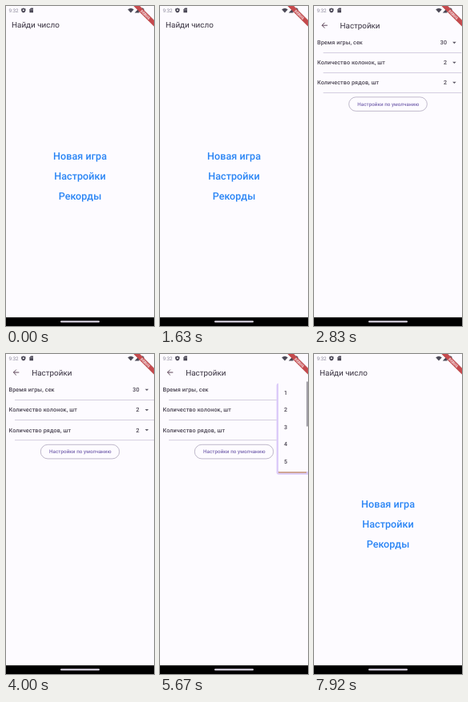
Recreate the animation shown at these times as an HTML page. Size 185x400 px, loop 8000 ms.

```html
<!DOCTYPE html>
<html lang="ru">
<head>
<meta charset="utf-8">
<title>Найди число</title>
<style>
  html, body { margin: 0; width: 100%; height: 100%; overflow: hidden; background: #fdfbff; }
  svg { display: block; width: 100vw; height: 100vh; }
  text { font-family: Roboto, sans-serif; fill: #37313f; text-rendering: geometricPrecision; }
  .title { font-size: 9.9px; }
  .label { font-size: 7.2px; font-weight: 500; letter-spacing: .11px; fill: #4a4452; }
  .link { font-size: 12.6px; font-weight: 500; fill: #2a85f5; letter-spacing: .04px; }
  .mid { text-anchor: middle; }
  .end { text-anchor: end; }
  .reset { font-size: 6.3px; font-weight: 500; fill: #7c6ab2; letter-spacing: .04px; }
  .clock { font-size: 6.3px; fill: #8a8799; }
  .debug { font-size: 4.6px; font-weight: 900; fill: #f6e3e6; }
</style>
</head>
<body>
<svg viewBox="0 0 185 400">
  <defs>
    <clipPath id="screen"><rect width="185" height="389.2"/></clipPath>
    <clipPath id="menuClip"><rect id="menuWindow" x="140" width="45"/></clipPath>
    <filter id="blur"><feGaussianBlur stdDeviation=".5"/></filter>
  </defs>
  <rect width="185" height="400" fill="#fdfbff"/>
  <g clip-path="url(#screen)">
    <g id="home">
      <rect width="185" height="390" fill="#fdfbff"/>
      <text class="title" x="7" y="26.5">Найди число</text>
    </g>
    <g id="settings">
      <rect width="185" height="390" fill="#fdfbff"/>
      <path d="M16.3 23H9.4M12.8 19.6L9.4 23L12.8 26.4" fill="none" stroke="#4a2f45" stroke-width=".9"/>
      <text class="title" x="32.2" y="26.5">Настройки</text>
      <g id="rows"></g>
      <rect x="43.3" y="113.3" width="98.4" height="17.6" rx="8.8" fill="none" stroke="#a49bb4" stroke-width=".7"/>
      <text class="reset mid" x="92.8" y="124.4">Настройки по умолчанию</text>
    </g>
    <g id="menu">
      <rect id="shadow" x="145.6" width="45" rx="3" fill="#dccbf9" filter="url(#blur)"/>
      <rect id="edge" x="148" width="35" height="2.2" fill="#cfa795"/>
      <rect id="panel" x="148" width="40" rx="1.5" fill="#fdfbff"/>
      <g id="items" clip-path="url(#menuClip)">
        <rect x="183" y="34.5" width="2" height="56" fill="#a4a1a9"/>
      </g>
    </g>
  </g>
  <g fill="#4b4856">
    <text class="clock" x="3.5" y="7.8">9:32</text>
    <path d="M21.8 2.4L24.5 3.5V5.4Q24.3 7.6 21.8 8.6Q19.3 7.6 19.1 5.4V3.5Z"/>
    <circle cx="21.8" cy="5.3" r="1" fill="#fdfbff"/>
    <path d="M31 2.6H34V8.3H29.4V4.2Z"/>
    <path d="M30.9 4.2V5.2M32.1 4.2V5.2M33.2 4.2V5.2" stroke="#fdfbff" stroke-width=".5"/>
    <path d="M152.2 4.2Q156 1.2 159.8 4.2L156 8.5Z"/>
    <path d="M160.8 8.4L166.5 2.6V8.4Z"/>
    <path d="M168.8 3.2H169.8V2.4H171.4V3.2H172.4V8.5H168.8Z"/>
  </g>
  <g transform="translate(185 0) rotate(45)">
    <rect x="-20" y="12.6" width="40" height="5.4" fill="#000" opacity=".3" filter="url(#blur)"/>
    <rect x="-20" y="12.6" width="40" height="5.4" fill="#c54a4d"/>
    <text class="debug mid" y="17">DEBUG</text>
  </g>
  <rect y="389.2" width="185" height="10.8"/>
  <rect x="68" y="393.4" width="49" height="2" rx="1" fill="#eee8f8"/>
</svg>
<script>
const LOOP = 8000;
const PUSH = 2670, OPEN = 4950, CLOSE = 6790, POP = 7500, SPAN = 300;
const MENU = { top: 33.5, bottom: 147, rowTop: 59, rowBottom: 81 };

const $ = id => document.getElementById(id);
const [home, settings, menu, panel, shadow, edge, win] =
  ['home', 'settings', 'menu', 'panel', 'shadow', 'edge', 'menuWindow'].map($);
const clamp = v => Math.max(0, Math.min(1, v));
const part = (t, from, to) => clamp((t - from) / (to - from));
const mix = (a, b, p) => a + (b - a) * p;
const easeOut = t => 1 - (1 - t) ** 4;

function add(parent, tag, attrs, text = '') {
  const el = document.createElementNS('http://www.w3.org/2000/svg', tag);
  for (const key in attrs) el.setAttribute(key, attrs[key]);
  el.textContent = text;
  parent.append(el);
  return el;
}

['Новая игра', 'Настройки', 'Рекорды'].forEach((s, i) =>
  add(home, 'text', { class: 'link mid', x: 92.5, y: 192 + 25 * i }, s));

[['Время игры, сек', 30], ['Количество колонок, шт', 2], ['Количество рядов, шт', 2]]
  .forEach(([label, value], i) => {
    const y = 44.8 + 25.1 * i, rows = $('rows');
    add(rows, 'text', { class: 'label', x: 3.5, y: y + 2.5 }, label);
    add(rows, 'text', { class: 'label end', x: 166.6, y: y + 2.5 }, value);
    add(rows, 'path', { d: `M173.7 ${y - 1}h4.6l-2.3 2.3z`, fill: '#5d5866' });
    add(rows, 'rect', { x: 11, y: y + 12.4, width: 174, height: .7, fill: '#c3bcd2' });
  });

const items = [1, 2, 3, 4, 5].map((n, i) =>
  add($('items'), 'text', { class: 'label', x: 155, y: 50.7 + 21.5 * i }, n));

function pose(el, scale, opacity) {
  el.setAttribute('transform', `translate(92.5 195) scale(${scale}) translate(-92.5 -195)`);
  el.setAttribute('opacity', opacity);
}

function drawPages(t) {
  const push = part(t, PUSH, PUSH + SPAN), pop = part(t, POP, POP + SPAN);
  if (t < POP) {
    pose(home, mix(1, 1.05, easeOut(push)), 1);
    pose(settings, mix(.85, 1, easeOut(push)), part(push, .1, .25));
  } else {
    pose(home, mix(1.1, 1, easeOut(pop)), 1);
    pose(settings, mix(1, .9, easeOut(pop)), 1 - part(pop, .08, .21));
  }
}

function setBox(el, y, height) {
  el.setAttribute('y', y);
  el.setAttribute('height', height);
}

function drawMenu(t) {
  const open = part(t, OPEN, OPEN + SPAN), close = part(t, CLOSE, CLOSE + 85);
  const grow = easeOut(part(open, .25, .5));
  const top = mix(MENU.rowTop, MENU.top, grow);
  const height = mix(MENU.rowBottom, MENU.bottom, grow) - top;
  menu.setAttribute('opacity', part(open, 0, .25) * (1 - close));
  setBox(panel, top, height);
  setBox(win, top, height);
  setBox(shadow, top + 3, height + .7);
  edge.setAttribute('y', top + height - .2);
  edge.setAttribute('opacity', 1 - close);
  items.forEach((el, i) =>
    el.setAttribute('opacity', i === 1 ? 1 : part(open, .5 + i * .07, .68 + i * .07)));
}

function frame(now) {
  const t = now % LOOP;
  drawPages(t);
  drawMenu(t);
  requestAnimationFrame(frame);
}
frame(performance.now());
</script>
</body>
</html>
```
